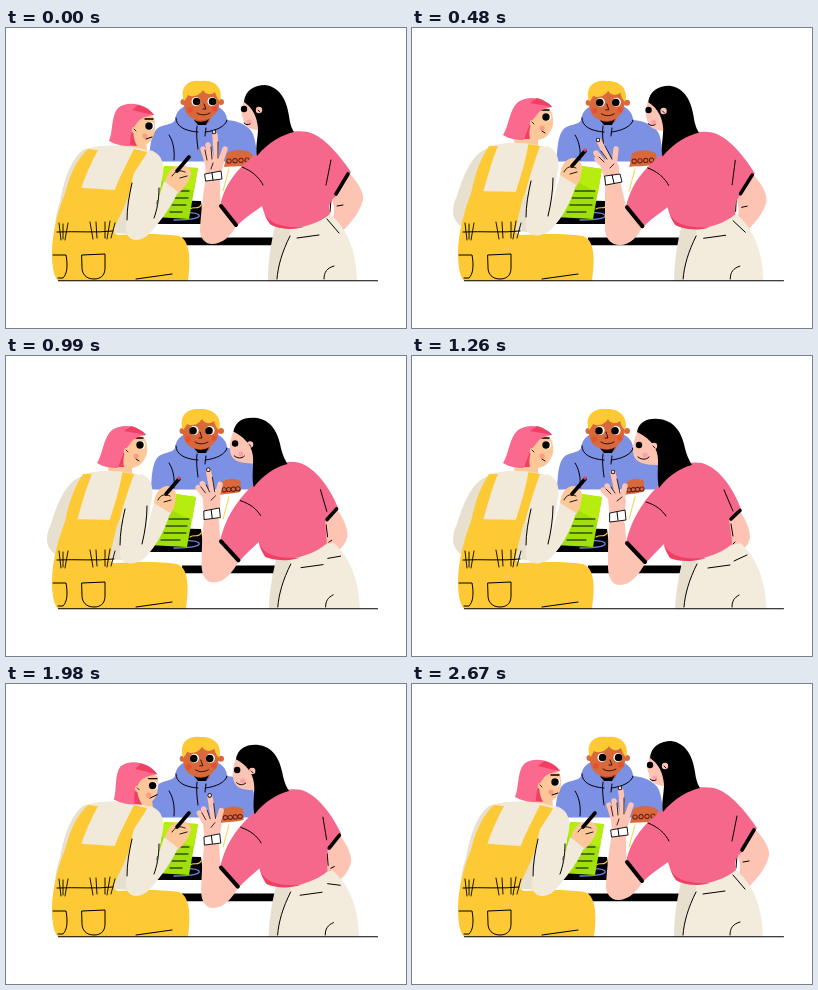
An HTML page that plays this animation: 400x300 px, repeating every 2.7 s.

```html
<!DOCTYPE html>
<html lang="en">
<head>
<meta charset="utf-8">
<title>Team at a table</title>
<style>
  html, body { margin: 0; width: 100%; height: 100%; overflow: hidden; background: #fff; }
  svg { display: block; width: 100vw; height: 100vh; }
  path { stroke-linecap: round; stroke-linejoin: round; }
</style>
</head>
<body>
<svg id="stage" viewBox="0 0 400 300"></svg>
<script>
const LOOP = 2700, STEP = 30;
const INK = '#000', SKIN = '#fdc3b3', PEACH = '#fdc799', CREAM = '#f1e9da', SHADE = '#e8e0cf',
      YELLOW = '#fdc935', PINK = '#f5688c', HAIR = '#fb698f', RED = '#f03f63',
      BLUE = '#7c90e4', BROWN = '#d9693a', GREEN = '#9fe00a';

// Each track: [time, value] pairs, eased in between.
const tracks = {
  body: [[0, 0], [60, 0], [430, 1], [1260, 1], [1590, .1], [1900, 0], [2700, 0]],
  arm:  [[0, 0], [60, 0], [430, 1], [1260, 1], [1590, .5], [1950, 0], [2700, 0]],
  head: [[0, 0], [60, 0], [430, 1], [1260, 1], [1590, .12], [1980, -.4], [2520, 0], [2700, 0]],
  lean: [[0, 0], [450, .12], [750, .58], [1200, 1], [1650, 1], [1980, .62], [2580, 0], [2700, 0]],
  wave: [[0, 0], [420, 1], [510, 1], [780, 0], [2700, 0]],
  boy:  [[0, 0], [480, .8], [750, 1], [1590, 1], [1980, .8], [2580, 0], [2700, 0]]
};

function valueAt(keys, t) {
  let i = 1;
  while (keys[i][0] < t) i++;
  const [t0, a] = keys[i - 1], [t1, b] = keys[i];
  const p = (t - t0) / (t1 - t0);
  return a + (b - a) * (1 - Math.cos(Math.PI * p)) / 2;
}

const stage = document.getElementById('stage');
const moving = [];
const split = d => d.split(/(-?\d+\.?\d*)/);

// One pose stays still; two or three are blended by the named track.
function shape(track, attrs, ...poses) {
  const el = document.createElementNS('http://www.w3.org/2000/svg', 'path');
  for (const k in attrs) el.setAttribute(k, attrs[k]);
  el.setAttribute('d', poses[0]);
  stage.append(el);
  if (poses.length > 1) moving.push({ el, track, poses: poses.map(split) });
  return el;
}
const fill = (color, track, ...poses) => shape(track, { fill: color }, ...poses);
const line = (color, width, track, ...poses) =>
  shape(track, { fill: 'none', stroke: color, 'stroke-width': width }, ...poses);
const dot = (color, r, track, ...points) =>
  line(color, r * 2, track, ...points.map(([x, y]) => `M${x} ${y} L${x + .01} ${y}`));

function boy() {
  fill(BLUE, 'boy',
    'M143 134 C144 114 146 101 156 98 C163 96 168 95 169 92 C170 83 176 78 184 77 L208 77 C217 80 221 86 221 92 C232 93 243 97 247 106 C250 114 251 124 251 134Z',
    'M145 134 C146 114 147 101 157 98 C163 96 168 95 169 92 C170 83 176 78 184 77 L208 77 C217 80 221 86 221 92 C232 93 243 97 247 106 C250 114 250 124 250 134Z');
  fill('#c9532e', '', 'M186 86 L206 86 L203 94 L196 97 L189 94Z');
  fill(INK, '', 'M188 92 C194 95 199 94 203 91 L200 97 L192 97Z');
  line(INK, 1, '', 'M170 90 C170 98 178 103 192 104 M221 92 C220 98 210 103 199 104');
  line(INK, 1, '', 'M191 98 C190 105 191 113 192 121 M200 100 L199 108 M168 132 C169 122 167 113 163 107');
  dot(BROWN, 3, 'boy', [177.5, 74], [176.5, 75]);
  dot(BROWN, 3, 'boy', [215, 74], [215, 75]);
  fill(BROWN, 'boy',
    'M178 66 C176 86 184 92 195 92 C208 92 215 82 214 66 C210 54 182 54 178 66Z',
    'M177 67 C175 87 183 93 194 93 C207 93 214 83 213 67 C209 55 181 55 177 67Z');
  for (const x of [189, 205]) {
    dot('#fff', 4.5, 'boy', [x + 1, 73.5], [x - 1, 74.5]);
    dot(INK, 3.8, 'boy', [x + 1.6, 73.5], [x - 2, 74.7]);
  }
  dot('#e5502f', 2.8, 'boy', [184, 82], [182, 83]);
  dot('#e5502f', 2.8, 'boy', [209, 81], [208, 82]);
  line('#2d100c', 1, 'boy', 'M198 76 L200 81 L197 81 M191 85 C195 88 201 87 204 85',
    'M194 76 L196 82 L193 82 M189 86 C193 89 199 88 202 86');
  fill(YELLOW, 'boy',
    'M178 73 C173 58 183 51 195 53 C208 51 218 60 214 73 C211 71 210 67 209 64 C204 68 199 66 197 62 C194 67 187 70 182 67 C181 69 180 71 178 73Z',
    'M177 74 C172 59 182 52 194 53 C207 52 217 61 213 74 C210 72 209 68 208 65 C203 69 198 67 196 63 C193 68 186 71 181 68 C180 70 179 72 177 74Z');
}

function table() {
  fill('#fff', '', 'M135 133.5 L251 133.5 L272 216 L140 216Z');
  fill(INK, '', 'M150 172 L195 173 L198 196 L143 196Z');
  line('#6f86e8', 1.3, '', 'M166 189 C172 183 190 184 193 187 C195 190 186 192 168 192');
  line(YELLOW, 1.2, '', 'M184 181 C188 178 193 182 195 177');
  fill(INK, '', 'M176 209.6 H274 V217.3 H176Z');
  line('#f6d96a', 1.2, '', 'M223 141 L217 163');
  fill(GREEN, 'arm', 'M158 138 L192 140 L183 191 L149 189Z', 'M163 137 L190 141 L181 191 L142 189Z');
  fill('#b6ec10', 'arm', 'M158 138 L192 140 L188 163 L155 152Z', 'M163 137 L190 141 L186 165 L158 150Z');
  line(INK, 1, 'arm', 'M166 163 L183 163 M164 170 L182 170 M166 177 L180 177 M164 184 L176 184',
    'M163 163 L183 163 M160 170 L181 170 M158 177 L180 177 M155 184 L174 184');
  fill(BROWN, 'lean', 'M221 125 C228 121 240 121 246 126 L247 136 C238 139 226 138 218 139Z',
    'M215 126 C220 122 227 122 232 125 L232 135 C227 138 220 137 212 139Z');
  for (let i = 0; i < 4; i++) {
    const spots = [[223 + 6 * i, 133 - i / 3], [217 + 4.3 * i, 134 - i / 3]];
    dot('#571a16', 2.6, 'lean', ...spots);
    dot(BROWN, 1.7, 'lean', ...spots);
  }
}

function leftWoman() {
  fill(PEACH, 'head', 'M114 110 L140 110 L141 123 L114 122Z', 'M103 104 L126 106 L126 119 L102 118Z');
  fill(SHADE, 'body',
    'M77 122 C95 115 130 117 146 124 C152 140 140 190 124 206 L50 200 C48 195 51 182 54 174 C58 150 66 130 77 122Z',
    'M72 122 C90 112 122 114 138 121 C146 140 132 190 115 204 L49 198 C38 191 40 178 45 168 C52 145 60 128 72 122Z');
  fill(CREAM, 'body',
    'M84 120 C100 116 130 117 146 124 C152 140 140 160 124 166 L66 166Z',
    'M78 118 C94 113 122 114 138 121 C146 140 132 160 115 166 L62 166Z');
  fill(YELLOW, 'body',
    'M62 159 C52 180 46 205 46 225 C46 240 48 248 52 253 L182 253 C185 232 184 212 173 208 C150 205 130 206 112 207 C106 205 108 200 110 196 C118 180 122 170 124 163Z',
    'M60 163 C53 180 46 205 46 225 C46 240 48 248 52 253 L180 253 C183 232 183 212 171 208 C150 205 130 206 108 207 C102 205 104 200 105 196 C108 180 111 170 113 164Z');
  fill(YELLOW, 'body', 'M82 121 L92 122 C85 135 79 148 75 161 L59 166 C64 145 72 130 82 121Z',
    'M77 118 L86 118 C80 132 75 150 71 165 L59 166 C63 145 69 130 77 118Z');
  fill(YELLOW, 'body', 'M128 121 L141 124 C136 136 130 150 124 165 L107 166 C114 148 121 135 128 121Z',
    'M116.5 116 L128 118 C123 132 117 150 113 166 L103 166 C109 148 113 135 116.5 116Z');
  line(INK, 1, 'body', 'M51 204 C70 203 90 205 107 203', 'M51 204 C70 203 90 205 108 203');
  line(INK, .9, '', 'M53 195 L55 212 M57 196 L57 211 M62 195 L59 212 M84 194 L87 211 M90 194 L91 210 M99 194 L99 210 M104 193 L101 211 M109 195 L105 210');
  line(INK, 1, '', 'M76 227 L99 226 L99 240 C99 248 94 251 88 251 C80 251 76 246 76 240Z M47 227 L60 227 C62 238 61 246 57 250 L52 250 M130 251 L166 246');

  fill(PEACH, 'arm', 'M159 155 C160 146 166 139 172 138 C178 136 186 139 185 146 C183 154 178 160 172 166Z',
    'M148 149 C148 140 152 132 160 130 C167 129 171 136 170 142 C168 150 168 154 164 159Z');
  fill(CREAM, 'arm',
    'M143 122 C154 124 159 134 157 146 C154 160 152 168 150 178 L158 153 L172 164 C164 182 149 200 141 208 C131 215 121 213 120 201 C120 180 124 160 128 145Z',
    'M134 118 C144 120 148 130 146 142 C144 156 141 166 140 176 L148 147 L164 157 C158 178 146 196 136 204 C126 210 114 208 114 198 C114 180 118 158 120 145Z');
  line(INK, 1, 'arm', 'M126 155 C123 168 121 180 121 192 M153 160 C153 172 151 182 148 190',
    'M119 153 C116 166 114 178 114 189 M141 150 C141 162 139 176 136 188');
  line(INK, 3.6, 'arm', 'M171 143 L183 129', 'M160 138 L173 123');
  line(INK, .9, 'arm', 'M166 148 C170 142 174 142 179 144 M174 150 L181 148', 'M152 144 C155 138 159 138 164 140 M158 146 L165 144');
  const tip = dot('#ec4256', 1.7, 'arm', [184, 128], [173, 122]);

  fill(PEACH, 'head', 'M126 92 C134 85 145 86 148 90 C150 98 149 106 146 111 C141 119 130 119 122 116Z',
    'M118 84 C126 79 136 79 139 83 C142 90 142 97 139 102 C135 112 124 114 113 111Z');
  dot('#fb9a86', 2.6, 'head', [139, 108], [130, 100]);
  dot('#fff', 4.2, 'head', [144, 98], [135, 89]);
  dot(INK, 3.7, 'head', [143, 98], [134, 89]);
  line(INK, 1.3, 'head', 'M139 91 L147 91', 'M130 82 L137 82');
  line(INK, 1, 'head', 'M140 111 L146 109', 'M130 103 C133 105 136 104 138 102');
  fill(RED, 'head', 'M118 100 L130 94 C126 103 127 110 131 118 L118 117Z', 'M108 92 L122 88 C117 98 117 106 118 111 L106 111Z');
  fill(HAIR, 'head',
    'M103 113 C107 104 105 88 112 80 C122 72 141 76 148 87 C141 88 134 90 131 95 C125 102 124 110 124 118 C117 118 110 117 103 113Z',
    'M91 107 C97 98 97 82 106 74 C118 66 134 71 140 79 C134 80 127 82 124 88 C118 94 115 103 112 112 C104 112 97 111 91 107Z');
  fill(RED, 'head', 'M132 77 C140 79 145 83 148 87 C142 86 135 84 126 82Z', 'M125 70 C132 72 138 76 140 79 C134 78 126 76 118 75Z');
  dot(PEACH, 3.2, 'head', [129, 102], [121, 95]);
  line(INK, .8, 'head', 'M128 101 L130 103', 'M120 94 L122 96');
  return tip;
}

function rightWoman() {
  fill(SKIN, 'lean', 'M330 165 L344 146 C352 155 358 164 357 172 C354 184 344 198 328 210 L322 198 C328 192 330 182 326 172Z',
    'M317 163 L328 155 C334 164 338 174 338 181 C337 188 334 192 328 194 L316 196 C318 182 318 176 314 168Z');
  line(INK, 1, 'lean', 'M337 177 L331 178 M325 172 L324 184', 'M323 186 L321 188 M319 168 L321 180');
  fill(SHADE, 'lean', 'M270 194 L290 196 L275 253 L262 253 C262 230 266 210 270 194Z',
    'M272 198 L290 200 L276 253 L263 253 C264 232 268 214 272 198Z');
  fill('#f3ecdd', 'lean', 'M284 194 L324 186 C341 200 350 222 351 253 L271 253 C272 236 276 222 284 208Z',
    'M285 198 L328 187 C344 200 354 225 354.5 253 L272 253 C273 236 277 222 285 208Z');
  line(INK, 1, 'lean',
    'M291 210 L313 207 M321 191 L333 205 M284 208 C276 224 272 238 271 251 M318 251 C318 244 321 240 328 238',
    'M296 212 L318 209 M322 205 L335 199 M285 208 C277 224 273 238 272 251 M320 251 C320 245 322 242 327 239');

  fill(SKIN, 'lean', 'M238 71 C236 80 234 84 237 90 C238 98 242 101 252 102 L260 90 L252 72Z',
    'M226 73 C222 84 221 88 221 96 C222 106 230 109 247 109 L252 96 L244 76Z');
  dot('#fba0ab', 2.6, 'lean', [243, 94], [233, 99]);
  dot(INK, 3.2, 'lean', [238, 81], [227, 89]);
  line(INK, 1, 'lean', 'M238 95 C240 97 242 97 244 96', 'M226 101 C230 104 234 104 237 101');
  fill(PINK, 'lean',
    'M250 126 C264 106 285 101 302 104 C318 108 334 128 345 144 L330 168 C325 172 322 176 324 186 C310 198 280 206 264 196 C260 190 258 185 256 178 C245 186 236 192 231 198 L214 178 C218 160 226 145 250 126Z',
    'M246 130 C256 113 271 104 290 107 C308 112 322 134 329 153 L317 164 C318 172 320 180 320 188 C304 202 274 208 258 202 C254 196 252 192 252 188 C244 196 238 202 234 207 L214 187 C218 168 228 148 246 130Z');
  fill(RED, 'lean', 'M258 184 C262 196 278 200 298 199 C284 203 270 200 264 196 C261 192 259 188 258 184Z',
    'M253 190 C258 200 272 204 294 202 C278 207 266 205 258 202 C256 198 254 194 253 190Z');
  fill(INK, 'lean',
    'M238 74 C239 62 249 57 259 57 C275 59 281 74 283 88 C284 96 286 101 288 104 C278 106 262 114 251 128 C249 120 252 110 252 100 C251 89 247 80 238 74Z',
    'M225 76 C227 66 235 62 246 63 C262 64 269 76 272 88 C274 98 277 104 280 109 C268 112 256 120 247 132 C245 124 246 114 246 104 C246 94 241 84 225 76Z');
  dot(SKIN, 3.2, 'lean', [253, 82], [242, 90]);
  line(INK, .9, 'lean', 'M252 82 L254 84', 'M241 90 L243 92');
  line(INK, 1, 'lean', 'M236 139 C246 143 253 149 257 157 M325 132 L320 157', 'M234 146 C244 149 250 154 254 160 M312 134 L321 155');

  fill(SKIN, 'reach',
    'M215 178 L231 197 C225 208 216 216 206 216 C198 216 193 208 194 200 C195 185 197 165 200 149 L214 149 C214 162 214 170 215 178Z',
    'M215 187 L234 206 C226 220 218 229 208 229 C198 229 196 218 196 210 C196 195 196 178 198 164 L212 164 C214 172 213 180 215 187Z',
    'M214 178 L231 197 C226 209 218 217 208 217 C198 217 194 210 193 202 C193 185 193 170 193 152 L207 149 C210 160 212 170 214 178Z');
  line(INK, 4, 'lean', 'M215 178 L230 197', 'M215 187 L233 206');
  line(INK, 3.6, 'lean', 'M330 166 L342 146', 'M319 163 L328 154.5');

  fill(SKIN, 'reach', 'M200 150 L199 134 C203 127 214 128 218 134 L214 150Z',
    'M198 165 L196 142 C200 134 210 135 214 144 L212 165Z',
    'M193 153 L188 136 C194 128 203 130 207 138 L207 151Z');
  line(SKIN, 5.4, 'reach',
    'M203 140 L197 121 M207 138 L202 117 M211 136 L209 107 M213 138 L219 121',
    'M200 143 L191 134 M203 142 L195 130 M206 140 L201 117 M210 143 L213 130',
    'M196 142 L185 131 M194 138 L184 125 M198 134 L187 113 M202 139 L204 121');
  line(INK, .8, 'reach', 'M201 132 L199 122 M206 131 L205 119 M212 130 L212 114 M205 141 L207 135',
    'M199 138 L194 133 M203 137 L199 131 M208 137 L205 123 M205 145 L210 141',
    'M192 134 L187 129 M195 131 L189 123 M200 131 L193 118 M198 140 L202 136');
  dot(INK, 2.2, 'reach', [208, 104], [201, 116], [186, 112]);
  dot('#ffdcd2', 1.4, 'reach', [208, 104], [201, 116], [186, 112]);
  shape('reach', { fill: '#fff', stroke: INK, 'stroke-width': .9 },
    'M199 146 L215 143 L216 151 L200 153Z', 'M198 157 L213 154 L214 164 L198 166Z', 'M193 148 L208 146 L210 154 L194 157Z');
  line(INK, 1, 'reach', 'M206 145 L207 152', 'M205 156 L206 164', 'M200 147 L202 155');
}

boy();
table();
const penTip = leftWoman();
rightWoman();
line(INK, 1.1, '', 'M52.5 252.7 L371.5 252.7');

function draw(now) {
  const t = Math.floor(now % LOOP / STEP) * STEP;
  const v = {};
  for (const k in tracks) v[k] = valueAt(tracks[k], t);
  for (const { el, track, poses } of moving) {
    const w = track === 'reach'
      ? [(1 - v.lean) * (1 - v.wave), v.lean * (1 - v.wave), v.wave]
      : [1 - v[track], v[track]];
    el.setAttribute('d', poses[0].map((s, i) => i % 2
      ? poses.reduce((sum, p, j) => sum + w[j] * p[i], 0).toFixed(2) : s).join(''));
  }
  penTip.setAttribute('opacity', Math.min(1, v.arm * 2));
}

const start = performance.now();
function tick() {
  draw(performance.now() - start);
  requestAnimationFrame(tick);
}
tick();
</script>
</body>
</html>
```
